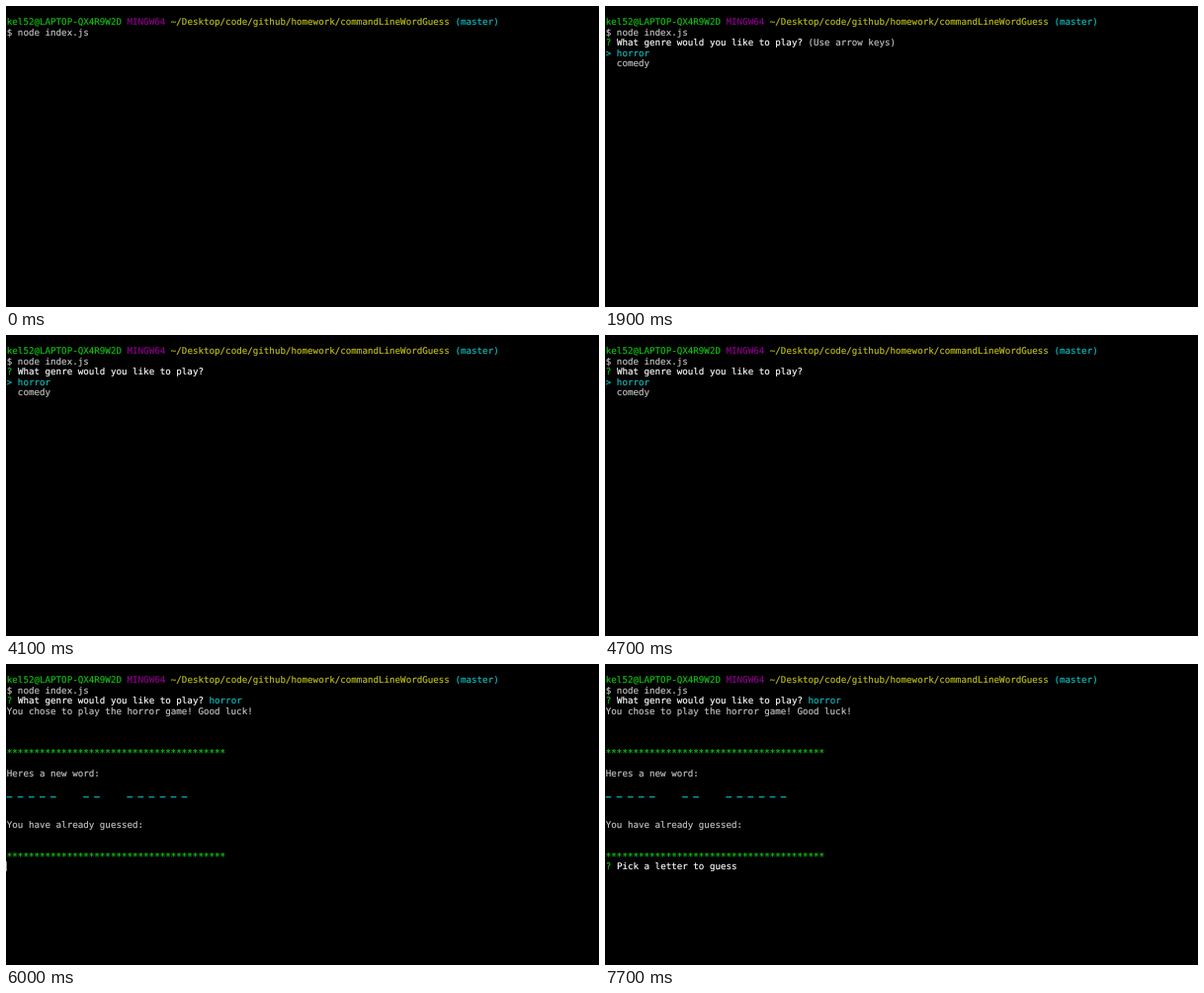
Write an HTML page that moves like this. It is 600 px wide and 305 px high and loops after 8000 ms.

```html
<!DOCTYPE html>
<html lang="en">
<meta charset="utf-8">
<title>Terminal word game</title>
<style>
  html, body { margin: 0; width: 100%; height: 100%; overflow: hidden; background: #000; }
  #screen {
    position: absolute; left: 0; top: 10.75px;
    font: 9.2px/10.5px "DejaVu Sans Mono", monospace;
    text-rendering: geometricPrecision; font-variant-ligatures: none;
    white-space: pre; color: #c4c4c4;
  }
  #text { position: relative; left: .8px; top: 1.25px; -webkit-text-stroke: .15px; }
  .green { color: #14c214; }
  .purple { color: #8c008c; }
  .yellow { color: #bfbf1c; }
  .cyan { color: #10bfbf; }
  .white { color: #fff; }
  .blanks { color: #10bfbf; font-weight: bold; position: relative; top: -2px; }
  #cursor { position: absolute; width: 1px; height: 10.5px; background: #909090; }
</style>
<div id="screen"><div id="text"></div><div id="cursor"></div></div>
<script>
const LOOP = 8000, ROW = 10.5;
const PROMPT = 1900, FIRST_KEY = 3800, GAME = 6000, PICK = 6100;
const toggles = [3800, 4100, 4400, 4700, 4800, 5400];
// Visible spans of the cursor: start, end, column, row
const blinks = [
  [500, 1000, 15, 1],
  [1100, 1700, 0, 2],
  [6000, 6100, 0, 18],
  [6100, 6600, 26, 18],
  [7100, 7700, 26, 18],
];

const text = document.getElementById('text');
const cursor = document.getElementById('cursor');
const paint = (style, s) => `<span class="${style}">${s}</span>`;

const shell = [
  [paint('green', 'kel52@LAPTOP-QX4R9W2D'), paint('purple', 'MINGW64'),
   paint('yellow', '~/Desktop/code/github/homework/commandLineWordGuess'),
   paint('cyan', '(master)')].join(' '),
  '$ node index.js',
];
const ask = s => paint('green', '?') + ' ' + paint('white', s) + ' ';
const question = ask('What genre would you like to play?');
const stars = paint('green', '*'.repeat(40));
const blanks = [5, 2, 6].map(n => Array(n).fill('_').join(' ')).join('     ');

function menu(t) {
  const chosen = toggles.filter(k => t >= k).length % 2;
  const items = ['horror', 'comedy'].map((name, i) =>
    i === chosen ? paint('cyan', '> ' + name) : '  ' + name);
  return [question + (t < FIRST_KEY ? '(Use arrow keys)' : ''), ...items];
}

function game(t) {
  return [
    question + paint('cyan', 'horror'),
    'You chose to play the horror game! Good luck!',
    '', '', '', stars,
    '', 'Heres a new word:',
    '', paint('blanks', blanks),
    '', '', 'You have already guessed:',
    '', '', stars,
    t < PICK ? '' : ask('Pick a letter to guess'),
  ];
}

let shown = '';
function draw() {
  const t = performance.now() % LOOP;
  const output = t < PROMPT ? [] : t < GAME ? menu(t) : game(t);
  const html = [...shell, ...output].join('\n');
  if (html !== shown) text.innerHTML = shown = html;

  const blink = blinks.find(([start, end]) => t >= start && t < end);
  cursor.hidden = !blink;
  if (blink) {
    cursor.style.left = blink[2] + 'ch';
    cursor.style.top = blink[3] * ROW + 'px';
  }
  requestAnimationFrame(draw);
}
draw();
</script>
</html>
```
